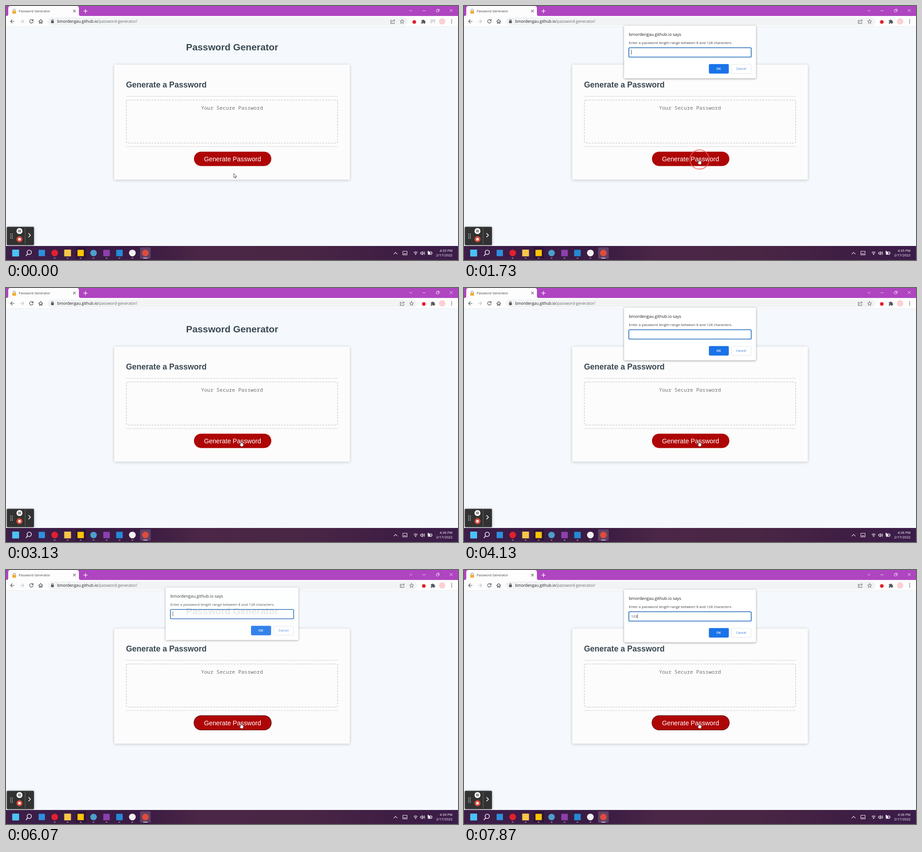
Write an HTML page that moves like this. It is 998 px wide and 561 px high and loops after 8 s.

```html
<!DOCTYPE html>
<html lang="en">
<head>
<meta charset="utf-8">
<title>Password Generator</title>
<style>
  html, body { margin: 0; width: 100%; height: 100%; overflow: hidden; background: #f5f9fd; }
  svg { display: block; width: 998px; height: 561px; }
  text { font-family: "Open Sans", "Noto Sans", sans-serif; white-space: pre; }
  .arial { font-family: "Liberation Sans", Arial, sans-serif; }
  .mono { font-family: "Noto Sans Mono", monospace; }
  .mid { text-anchor: middle; }
  .line { fill: none; stroke-linecap: round; stroke-linejoin: round; }
  .card { filter: drop-shadow(0 1px 3px rgba(0,0,0,.22)); }
  .box { filter: drop-shadow(0 1px 2px rgba(0,0,0,.4)); }
  .msg { font-size: 7.95px; fill: #3c4043; }
  .says { font-size: 9.08px; fill: #202124; }
  .btn { font-size: 7.2px; font-weight: 600; text-anchor: middle; }
</style>
</head>
<body>
<svg viewBox="0 0 998 561">
  <defs>
    <linearGradient id="bar">
      <stop offset="0" stop-color="#3d1e49"/>
      <stop offset=".3" stop-color="#3a1b43"/>
      <stop offset=".43" stop-color="#4b2646"/>
      <stop offset=".65" stop-color="#4a2645"/>
      <stop offset=".85" stop-color="#3f1e44"/>
      <stop offset="1" stop-color="#3b1c4a"/>
    </linearGradient>
  </defs>
  <rect width="998" height="561" fill="#f5f9fd"/>

  <!-- Page -->
  <text class="arial mid" x="499.3" y="98" font-size="20.8" font-weight="700" fill="#3a4852">Password Generator</text>
  <rect class="card" x="239" y="129.5" width="520" height="254" rx="2.5" fill="#fcfcfc"/>
  <text class="arial" x="265" y="180" font-size="17.5" font-weight="700" fill="#3a4852">Generate a Password</text>
  <path d="M265 199.5H733M265 310.5H733" stroke="#d9dadb"/>
  <rect x="265.7" y="207.6" width="466.6" height="95" rx="3.5" fill="none" stroke="#c5c6c7" stroke-width="1.3" stroke-dasharray="3.9 2.6"/>
  <text class="mono mid" x="499" y="229" font-size="11.4" fill="#737373">Your Secure Password</text>
  <rect id="focus" x="414.4" y="321" width="172" height="33" rx="16.5" fill="#1c1010"/>
  <rect x="415" y="321.7" width="170.8" height="31.8" rx="15.9" fill="#ae0606"/>
  <text class="arial mid" x="500.2" y="342.5" font-size="14.28" fill="#fff">Generate Password</text>

  <!-- Tab strip -->
  <rect width="998" height="22" fill="#af45c0"/>
  <path d="M1 22Q5 22 5 18V5Q5 0 10 0H156Q161 0 161 5V18Q161 22 165 22Z" fill="#fdfdfd"/>
  <path class="line" d="M15.7 11V9.3a2.4 2.4 0 0 1 4.8 0V11" stroke="#a3a3a8" stroke-width="1.3"/>
  <rect x="14" y="10.5" width="8.2" height="6.4" rx="1" fill="#f0ad35"/>
  <text x="28" y="13.6" font-size="7.3" fill="#45474b">Password Generator</text>
  <path class="line" d="M148.8 8.8l4.6 4.6m0-4.6l-4.6 4.6" stroke="#45474b" stroke-width="1.1"/>
  <path class="line" d="M171.5 11.3h8m-4-4v8" stroke="#fff" stroke-width="1.3"/>
  <path class="line" d="M891 9l3 2.8L897 9M920 10.5h6M950.5 8.5h4.5v4.5h-4.5zM952 7h4.6v4.6M980 7l6 6m0-6l-6 6" stroke="#f3ddf6" stroke-width=".9"/>

  <!-- Toolbar -->
  <rect y="22" width="998" height="23.5" fill="#fdfdfd"/>
  <path d="M0 45.7H998" stroke="#e4e6e9" stroke-width=".8"/>
  <rect id="omni" x="92" y="25" width="795" height="18" rx="9" fill="#f1f3f4"/>
  <g class="line" stroke="#4e5155" stroke-width="1.2">
    <path d="M18.2 34h-8m3.7-3.8L10.2 34l3.7 3.8"/>
    <path d="M31.2 34h8m-3.7-3.8l3.7 3.8-3.7 3.8" stroke="#c0c2c5"/>
    <path d="M59.2 31.5a3.9 3.9 0 1 0 .7 3.1M59.9 29.6v2.7h-2.7"/>
    <path d="M72.3 34l4.3-4 4.3 4M73.6 33.4v4.7h2v-2.6h2v2.6h2v-4.7"/>
    <path d="M100.7 33v-1.2a1.8 1.8 0 0 1 3.6 0V33"/>
  </g>
  <rect x="99.5" y="32.8" width="6" height="5" rx=".7" fill="#4e5155"/>
  <text x="113" y="37.3" font-size="8.6" fill="#202124">bmordengau.github.io<tspan fill="#6a6e73">/password-generator/</tspan></text>
  <g id="tools">
    <g class="line" stroke="#5f6368" stroke-width="1">
      <path d="M852 31.5h-2.5v7h8V36M851.8 36q.5-4 4-4h2.4m-2-2.3l2.3 2.3-2.3 2.2"/>
      <path d="M874.5 29.8l1.3 3 3.2.3-2.4 2.1.7 3.2-2.8-1.7-2.8 1.7.7-3.2-2.4-2.1 3.2-.3z"/>
    </g>
    <circle cx="901.5" cy="35.2" r="4" fill="#e3202b"/>
    <path d="M917 31.5h2.6a1.6 1.6 0 0 1 3.2 0h2.2v2.6a1.6 1.6 0 0 1 0 3.2v1.7h-2.7a1.4 1.4 0 0 0-2.8 0H917v-2.4a1.4 1.4 0 0 0 0-2.8z" fill="#55585d"/>
  </g>
  <path id="media" class="line" d="M937.5 31h6.5m-6.5 2.8h6.5m-6.5 2.8h3.5m5-6v6.2m0-6.2h1.6" stroke="#9a9da1"/>
  <circle cx="963" cy="34" r="7" fill="#fbd0d5"/>
  <g fill="#4e5155"><circle cx="984" cy="30.5" r="1"/><circle cx="984" cy="34" r="1"/><circle cx="984" cy="37.5" r="1"/></g>

  <!-- Taskbar -->
  <rect y="530" width="998" height="31" fill="url(#bar)"/>
  <rect x="154" y="533" width="23" height="25" rx="2" fill="#2f153a"/>
  <rect x="296" y="533" width="23.5" height="25" rx="2" fill="#604066"/>
  <g id="apps"></g>
  <g class="line" stroke="#f1ebf3" stroke-width="1.1">
    <circle cx="51.3" cy="544" r="4.7" stroke-width="1.6"/>
    <path d="M47.8 547.7l-3.4 3.8" stroke-width="1.8"/>
    <path d="M856.5 547.8l3.7-3.6 3.7 3.6"/>
    <path d="M876.3 541.7h9.2v8h-9.2zM878.5 547.4h4.8"/>
    <path d="M900.6 544.4q3.8-3.4 7.6 0M902 546.2q2.4-2 4.8 0"/>
    <path d="M915.3 544.3h1.8l2.3-2v7.2l-2.3-2h-1.8zM921 544.2q1.5 1.6 0 3.4M923 542.7q2.6 3.2 0 6.4"/>
    <path d="M932 543h7.8v5.6H932z"/>
  </g>
  <circle cx="904.4" cy="548.3" r="1.2" fill="#f1ebf3"/>
  <path d="M932 543.5h5v5h-5zM940 544.6h1.3v2.5H940zM931 541h2.5v4H931z" fill="#f1ebf3"/>
  <g font-size="7.65" fill="#fff" text-anchor="end">
    <text id="clock" x="986" y="542.6"></text>
    <text x="986" y="553">2/17/2022</text>
  </g>

  <!-- Recorder -->
  <rect class="card" x="2" y="488" width="59.5" height="40" rx="1.5" fill="#323232" stroke="#4e4e4e"/>
  <path d="M42.3 490V526" stroke="#686868"/>
  <g id="grip" fill="#c9c9c9"></g>
  <circle cx="29.8" cy="497" r="6.6" fill="#fff"/>
  <path d="M28.3 494v6m3-6v6" stroke="#333" stroke-width="1.5"/>
  <circle cx="29.8" cy="515.2" r="6.6" fill="#da4b3b"/>
  <rect x="27.2" y="512.6" width="5.2" height="5.2" rx=".6" fill="#fff"/>
  <path class="line" d="M50 502.3l4 4-4 4" stroke="#fff" stroke-width="1.6"/>

  <!-- Dialogs -->
  <g id="prompt">
    <rect class="box" x="353.3" y="43.5" width="291.4" height="116.3" rx="2.5" fill="#fff"/>
    <text class="says" x="364" y="65.6">bmordengau.github.io says</text>
    <text class="msg" x="364" y="83.7">Enter a password length range between 8 and 128 characters.</text>
    <rect x="364" y="92.3" width="270.2" height="20.5" rx="1.8" fill="#fff" stroke="#1c66b5" stroke-width="1.6"/>
    <text id="typed" class="msg" x="369" y="105"></text>
    <rect id="caret" y="96.5" width=".8" height="10.5" fill="#222"/>
    <rect x="540.7" y="128.2" width="44" height="21" rx="2.4" fill="#1a73e8"/>
    <text class="btn" x="562.3" y="141.2" fill="#fff">OK</text>
    <rect x="590.3" y="128.7" width="43.7" height="20.3" rx="2.4" fill="#fff" stroke="#dadce0" stroke-width=".8"/>
    <text class="btn" x="612" y="141.2" fill="#2f79d8" style="font-weight:500">Cancel</text>
  </g>
  <g id="alert">
    <rect class="box" x="353.3" y="43.5" width="291.4" height="98" rx="2.5" fill="#fff"/>
    <text class="says" x="364" y="65.6">bmordengau.github.io says</text>
    <text class="msg" x="364" y="83.7">You need to provide a password length range between 8 and 128</text>
    <text class="msg" x="364" y="96.7">characters - please try again!</text>
    <rect x="591.4" y="109.3" width="43.4" height="22" rx="2.8" fill="#1c66b5"/>
    <rect x="592.7" y="110.6" width="40.8" height="19.4" rx="2" fill="#fff"/>
    <rect x="593.4" y="111.3" width="39.4" height="18" rx="1.6" fill="#1a73e8"/>
    <text class="btn" x="612.8" y="123" fill="#fff">OK</text>
  </g>

  <!-- Pointer -->
  <circle id="ring" cx="520" cy="339" r="21.3" fill="none" stroke="#ef5c5c" stroke-opacity=".8" stroke-width="2"/>
  <path id="arrow" d="M0 0V9l2-1.8 1.4 3.1 1.5-.7L3.6 6.6h2.8z" fill="#fff" stroke="#222" stroke-width=".8"/>
  <path id="hand" d="M-1 .8a1 1 0 0 1 2 0V4.2l3.4.8q1.1.3 1 1.4L5 9.2 4.2 11.6H-.6L-3.2 7.6q-.5-1 .5-1.3l1.7 1z" fill="#fff" stroke="#222" stroke-width=".7"/>
</svg>
<script>
const LOOP = 8000;
const $ = id => document.getElementById(id);
const show = (id, on) => $(id).setAttribute("visibility", on ? "visible" : "hidden");

// Each row starts with the time at which it takes over.
const pointer = [[0, 503, 370, 0], [130, 507, 363, 0], [200, 514, 350, 1], [330, 519, 338.5, 1]];
const prompt = [
  [0, 0, 0], [530, .88, -5], [670, 1, 0], [2130, .5, -5], [2200, .12, -9], [2270, 0, 0],
  [3670, .88, -5], [3730, 1, 0], [4470, .5, -5], [4530, .12, -9], [4600, 0, 0],
  [6070, .88, -5], [6200, 1, 0]
];
const notice = [
  [0, 0, 0], [2200, 1, -2.5], [2270, 1, 0], [3070, .4, -6], [3130, 0, 0],
  [4530, 1, -2.5], [4600, 1, 0], [5270, .4, -6], [5330, 0, 0]
];
const typing = [[0, ""], [7270, "1"], [7400, "12"], [7870, "123"]];
const caret = [
  [0, 1], [1070, 0], [1530, 1], [2070, 0], [2270, 1], [4130, 0],
  [4600, 1], [6530, 0], [7070, 1]
];

const at = (rows, t) => rows.findLast(row => row[0] <= t);

function place(id, [, alpha, dy]) {
  const sx = 1 - dy * .0014;
  $(id).setAttribute("opacity", alpha);
  $(id).setAttribute("transform", `translate(${499 * (1 - sx)} ${dy}) scale(${sx} 1)`);
}

function draw(t) {
  const [, x, y, over] = at(pointer, t);
  for (const id of ["arrow", "hand"]) $(id).setAttribute("transform", `translate(${x} ${y})`);
  show("arrow", !over);
  show("hand", over);
  show("ring", t >= 470 && t < 3070);
  show("focus", t >= 5330);

  place("prompt", at(prompt, t));
  place("alert", at(notice, t));
  const text = at(typing, t)[1];
  $("typed").textContent = text;
  $("caret").setAttribute("x", 369 + text.length * 4.55);
  show("caret", at(caret, t)[1]);

  const shift = t >= 1670 ? 21 : 0;
  $("tools").setAttribute("transform", `translate(${shift} 0)`);
  $("omni").setAttribute("width", 795 + shift);
  show("media", !shift);
  $("clock").textContent = t < 1870 ? "4:35 PM" : "4:36 PM";
}

// Taskbar icons: centre, half size, colour, round, width of the running mark.
const apps = [
  [21.3, 7.6, "#4cc2f5", 0, 0], [79, 7, "#2f8fdc", 0, 0], [107.5, 7.3, "#e3202e", 1, 4],
  [136, 7.5, "#f7c74a", 0, 4], [164.8, 7, "#fcc502", 0, 4], [193.3, 7.2, "#4d9fcb", 1, 4],
  [222, 7.2, "#8c3fae", 0, 4], [250.5, 7.2, "#2489d6", 0, 4], [279, 7.4, "#f3eff3", 1, 4],
  [307.8, 7.3, "#de4c3c", 1, 10]
];
$("apps").innerHTML = apps.map(([x, r, fill, round, mark]) =>
  `<rect x="${x - r}" y="${545.6 - r}" width="${2 * r}" height="${2 * r}" rx="${round ? r : 1}" fill="${fill}"/>` +
  `<rect x="${x - mark / 2}" y="556" width="${mark}" height="1.7" rx=".8" fill="${mark > 4 ? "#d9c9dd" : "#a596aa"}"/>`
).join("");
$("grip").innerHTML = Array.from({ length: 8 }, (_, i) =>
  `<circle cx="${10.3 + i % 2 * 3.6}" cy="${503.4 + (i >> 1) * 3.2}" r=".95"/>`).join("");

const start = performance.now();
function tick() {
  draw((performance.now() - start) % LOOP);
  requestAnimationFrame(tick);
}
tick();
</script>
</body>
</html>
```
